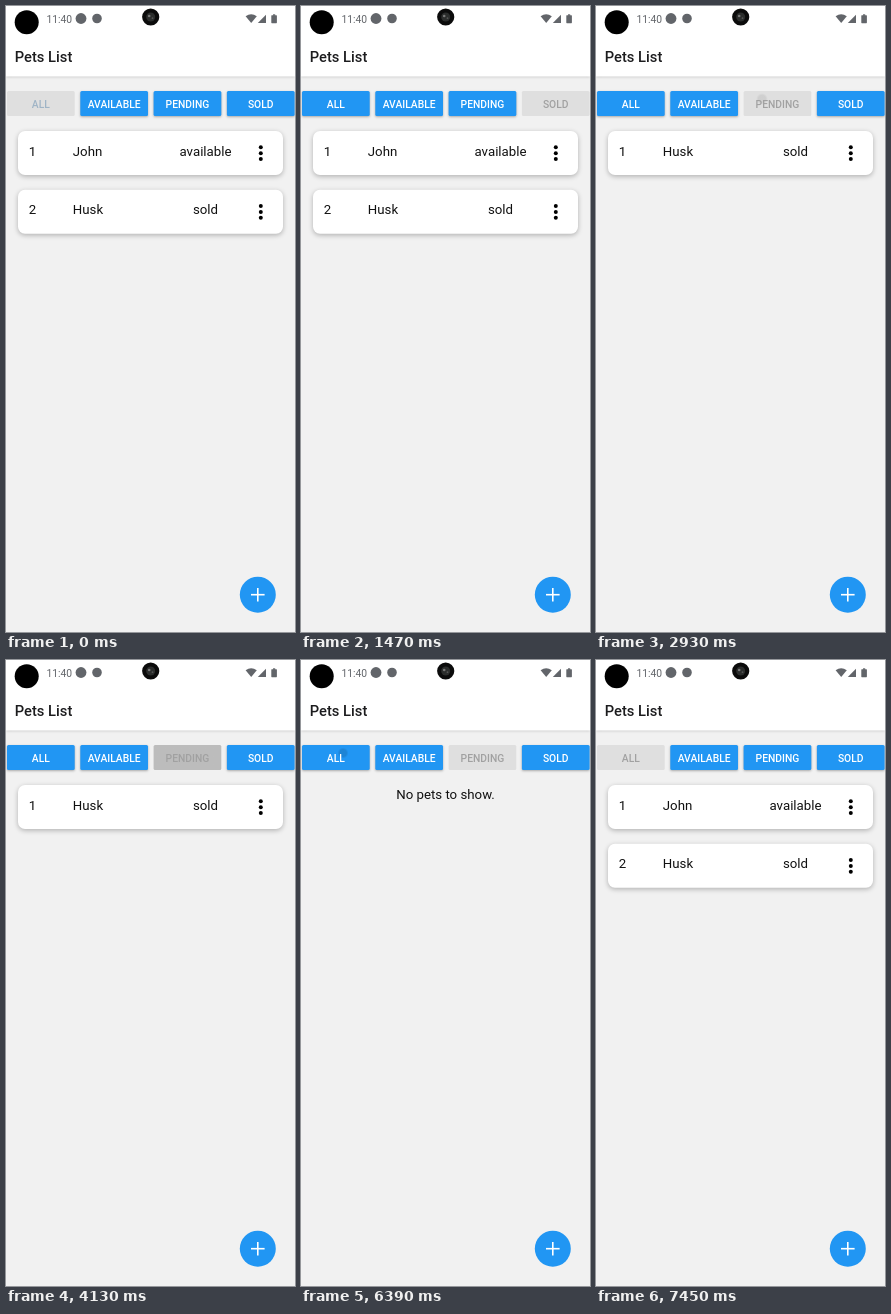
Animation, 289 px wide and 626 px high, one loop 8.66 s. Source, as an HTML page with a canvas:

```html
<!DOCTYPE html>
<html lang="en">
<head>
<meta charset="utf-8">
<title>Pets List</title>
<style>
html, body { margin: 0; width: 289px; height: 626px; overflow: hidden; }
canvas { display: block; }
</style>
</head>
<body>
<canvas id="stage" width="289" height="626"></canvas>
<script>
const ctx = document.getElementById('stage').getContext('2d');
const LOOP = 8660, BLUE = '#2196f3', ICON = '#62656a';
const SWAP = 30; // delay between a touch and the change of filter
const LABELS = ['ALL', 'AVAILABLE', 'PENDING', 'SOLD'];
const JOHN = ['John', 'available'], HUSK = ['Husk', 'sold'];

const touches = [
  { at: 870, button: 3, x: 251 },
  { at: 2890, button: 2, x: 166, held: true },
  { at: 6390, button: 0, x: 42 },
];
const lists = [[0, [JOHN, HUSK]], [1930, [HUSK]], [4470, []], [7450, [JOHN, HUSK]]];

function text(str, x, y, size, color, weight = 400, align = 'left') {
  ctx.font = `${weight} ${size}px Roboto, sans-serif`;
  ctx.fillStyle = color;
  ctx.textAlign = align;
  ctx.fillText(str, x, y);
}

function circle(x, y, r, color) {
  ctx.fillStyle = color;
  ctx.beginPath();
  ctx.arc(x, y, r, 0, 7);
  ctx.fill();
}

function box(x, y, w, h, r, color) {
  ctx.fillStyle = color;
  ctx.beginPath();
  ctx.roundRect(x, y, w, h, r);
  ctx.fill();
}

function shadow(alpha, blur, dy) {
  ctx.shadowColor = `rgba(0,0,0,${alpha})`;
  ctx.shadowBlur = blur;
  ctx.shadowOffsetY = dy;
}

function statusBar() {
  circle(20.7, 16.3, 12, '#000');
  text('11:40', 40.5, 16.6, 10.3, ICON);
  circle(75, 12.5, 5.4, ICON);
  circle(91, 12.5, 4.8, ICON);

  circle(144.7, 11, 8.6, '#0b0b0b');
  circle(144.7, 11, 4.5, '#2b2d2c');
  circle(143.2, 10, 1.3, '#777');
  circle(146.5, 12.2, .9, '#555');

  ctx.fillStyle = ICON;
  ctx.beginPath(); // wifi
  ctx.moveTo(245.2, 17);
  ctx.lineTo(239.6, 10.3);
  ctx.quadraticCurveTo(245.2, 6.3, 250.8, 10.3);
  ctx.fill();
  ctx.beginPath(); // signal
  ctx.moveTo(251.8, 17);
  ctx.lineTo(260, 17);
  ctx.lineTo(260, 8.7);
  ctx.fill();
  box(265.3, 9.2, 5.6, 8, .6, ICON);
  box(267, 8.3, 2.2, 1.5, 0, ICON);
}

function header() {
  shadow(.25, 3, .6);
  box(0, -5, 289, 75.6, 0, '#fff');
  shadow(0, 0, 0);
  text('Pets List', 8.8, 56.3, 14.7, '#1c1c1e', 500);
  statusBar();
}

function rippleAlpha(touch, t) {
  const d = t - touch.at;
  if (d < 0) return 0;
  if (touch.held) {
    if (t >= 4580) return 0;
    if (t >= 4470) return .08;
    return .07 + .087 * Math.max(0, Math.min(1, (d - 40) / 100));
  }
  return d < 80 ? .12 + .16 * d / 80 : Math.max(0, .28 * (220 - d) / 140);
}

function ripple(touch, t) {
  const alpha = rippleAlpha(touch, t);
  if (!alpha) return;
  const r = 5 + Math.max(0, t - touch.at - 40) * .3;
  const soft = ctx.createRadialGradient(touch.x, 93, r * .7, touch.x, 93, r * 1.1);
  soft.addColorStop(0, `rgba(0,0,0,${alpha})`);
  soft.addColorStop(1, 'rgba(0,0,0,0)');
  ctx.save();
  ctx.clip();
  ctx.fillStyle = soft;
  ctx.fillRect(0, 80, 289, 35);
  ctx.restore();
}

function buttons(t) {
  const last = touches.filter(touch => t >= touch.at + SWAP).pop();
  const active = last ? last.button : 0;
  LABELS.forEach((label, i) => {
    const x = 1 + i * 73.3, off = i === active;
    if (!off) shadow(.3, 2.5, 1);
    box(x, 85, 67.7, 25, 1.5, off ? '#dfdfdf' : BLUE);
    shadow(0, 0, 0);
    touches.filter(touch => touch.button === i).forEach(touch => ripple(touch, t));
    const dim = last ? '#a1a1a1' : '#9fb4c6';
    text(label, x + 33.8, 101.7, 10.3, off ? dim : '#fff', 500, 'center');
  });
}

function card([name, status], i) {
  const y = 125 + i * 58.7;
  shadow(.27, 5, 1.6);
  box(12, y, 265, 44, 7, '#fff');
  shadow(0, 0, 0);
  text(i + 1, 22.8, y + 24.7, 13.25, '#111');
  text(name, 66.8, y + 24.7, 13.25, '#111');
  text(status, 199.5, y + 24.7, 13.25, '#111', 400, 'center');
  [16.3, 22.2, 28.1].forEach(dy => circle(254.8, y + dy, 2, '#000'));
}

function addButton() {
  circle(251.8, 588.7, 18, BLUE);
  box(245, 587.9, 13.6, 1.6, 0, '#fff');
  box(251, 581.9, 1.6, 13.6, 0, '#fff');
}

function draw(now) {
  const t = now % LOOP;
  ctx.fillStyle = '#f1f1f1';
  ctx.fillRect(0, 0, 289, 626);
  header();
  buttons(t);
  const pets = lists.filter(([at]) => t >= at).pop()[1];
  pets.forEach(card);
  if (!pets.length) text('No pets to show.', 144.5, 139.3, 13.25, '#111', 400, 'center');
  addButton();
}

const start = performance.now();
function tick() {
  draw(performance.now() - start);
  requestAnimationFrame(tick);
}
tick();
</script>
</body>
</html>
```
